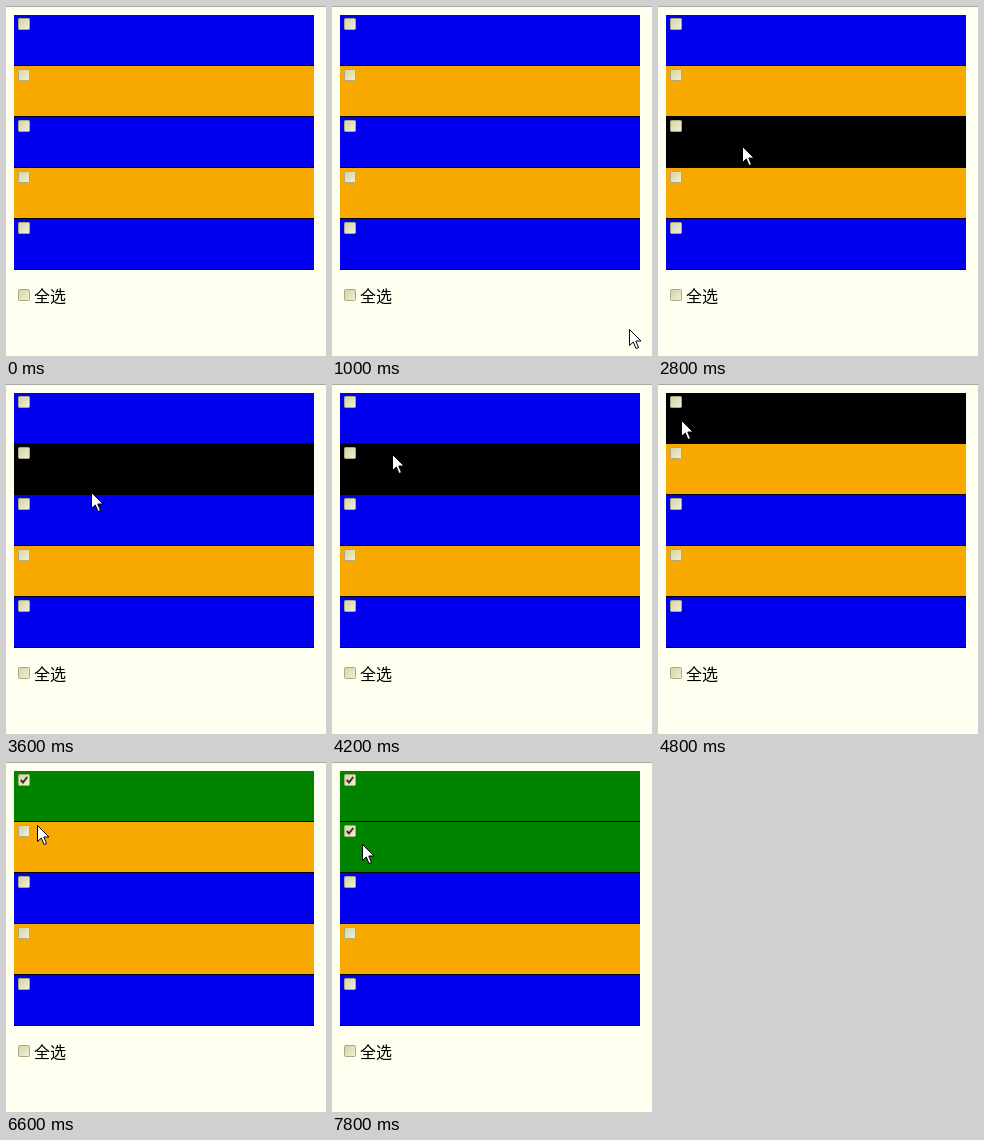
Animation, 320 px wide and 350 px high, one loop 8000 ms. Source, as an HTML page:

```html
<!DOCTYPE html>
<html lang="zh">
<head>
<meta charset="utf-8">
<style>
  html, body { margin: 0; width: 100%; height: 100%; overflow: hidden; background: #fffff0; }
  svg { display: block; }
  text { font: 300 16px "Noto Sans CJK SC", "Noto Sans CJK", sans-serif; }
</style>
</head>
<body>
<svg width="320" height="350" viewBox="0 0 320 350">
  <defs>
    <linearGradient id="face" x2="1" y2="1">
      <stop stop-color="#d3d3a6"/>
      <stop offset="1" stop-color="#f2f0d4"/>
    </linearGradient>
    <g id="box">
      <rect x=".5" y=".5" width="11" height="11" rx="1" fill="url(#face)" stroke="#aaa982"/>
    </g>
  </defs>
  <rect width="320" height="1" fill="#aaa9a4"/>
  <g id="rows"></g>
  <use href="#box" x="12" y="283"/>
  <text x="28" y="296">全选</text>
  <path id="pointer" d="M.5 .5V16.5L4.3 13 7 19.5 9.5 18.5 6.8 12H12Z" fill="#fff" stroke="#000"/>
</svg>
<script>
const LOOP = 8000, STEP = 200, HOVER_LAG = 60;
const TOP = 9, PITCH = 51;
const CHECK_TIMES = [5800, 7200];

// time, x, y of the pointer tip
const PATH = [
  [800, 308, 327], [1000, 297, 323], [1200, 275, 310], [1600, 165, 225],
  [2000, 84, 150], [2200, 83, 163], [2600, 84, 150], [3400, 85, 108],
  [3600, 85, 108], [4200, 60, 70], [4800, 23, 36], [5400, 18, 19],
  [6200, 20, 22], [6600, 31, 63], [7000, 19, 70], [7400, 20, 72], [7800, 30, 82]
];

const pointer = document.getElementById('pointer');
const rowsGroup = document.getElementById('rows');
rowsGroup.innerHTML = Array.from({ length: 5 }, (_, i) => `
  <g transform="translate(8 ${TOP + i * PITCH})">
    <rect width="300" height="51"/>
    <rect class="fill" width="300" height="50"/>
    <use href="#box" x="4" y="3"/>
    <path class="tick" d="M6.8 9 9 11.5 13.2 6" fill="none" stroke="#3c3020" stroke-width="2"/>
  </g>`).join('');
const rows = [...rowsGroup.children].map(row => ({
  fill: row.querySelector('.fill'),
  tick: row.querySelector('.tick')
}));

function pointerAt(time) {
  if (time < PATH[0][0]) return null;
  const next = PATH.findIndex(point => point[0] > time);
  if (next < 0) return PATH[PATH.length - 1].slice(1);
  const [t0, x0, y0] = PATH[next - 1], [t1, x1, y1] = PATH[next];
  const k = (time - t0) / (t1 - t0);
  return [x0 + (x1 - x0) * k, y0 + (y1 - y0) * k];
}

function hoveredRow(time) {
  const tip = pointerAt(time - HOVER_LAG);
  return tip && tip[0] < 308 ? Math.floor((tip[1] - TOP) / PITCH) : -1;
}

function draw(time) {
  const tip = pointerAt(time), hovered = hoveredRow(time);
  rows.forEach(({ fill, tick }, i) => {
    const checked = time >= CHECK_TIMES[i];
    const base = i % 2 ? '#f8a900' : '#0000ee';
    fill.setAttribute('fill', checked ? '#008400' : i === hovered ? '#000' : base);
    tick.setAttribute('visibility', checked ? 'visible' : 'hidden');
  });
  pointer.setAttribute('visibility', tip ? 'visible' : 'hidden');
  if (tip) pointer.setAttribute('transform', `translate(${tip.map(Math.round)})`);
}

const start = performance.now();
function tick() {
  const time = (performance.now() - start) % LOOP;
  draw(Math.floor(time / STEP) * STEP);
  requestAnimationFrame(tick);
}
tick();
</script>
</body>
</html>
```
